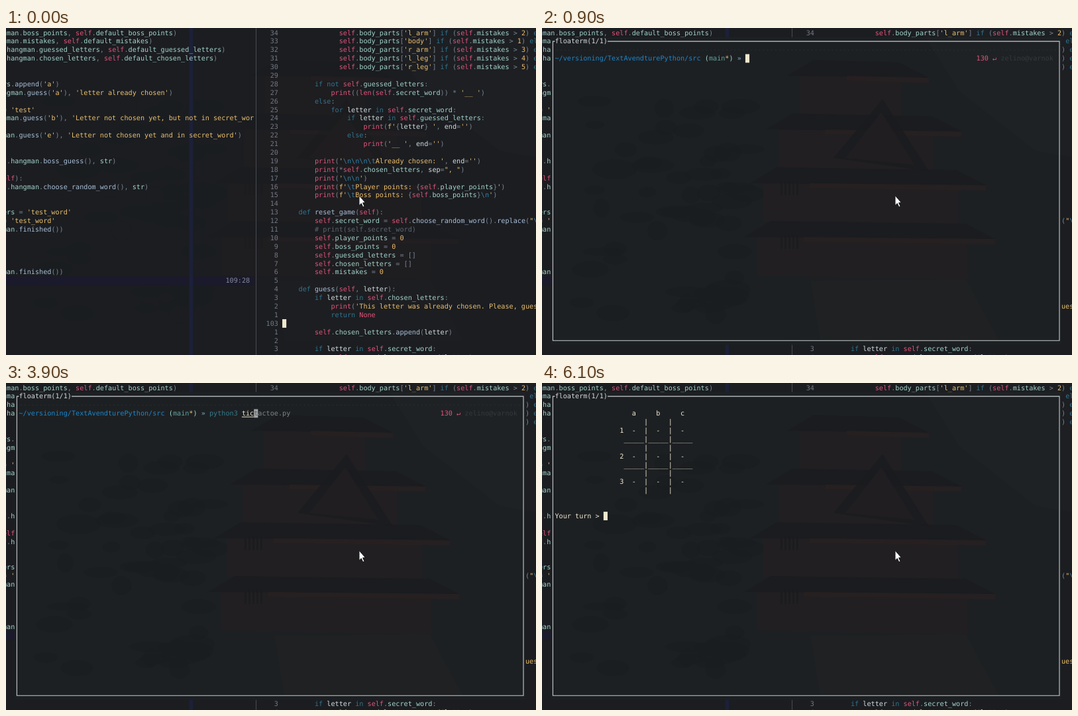
These frames come from a looping animation (800x493 px, 8000 ms). An HTML page with a canvas:

```html
<!DOCTYPE html>
<html lang="en">
<head>
<meta charset="utf-8">
<title>Terminal session</title>
<style>
html, body { margin: 0; width: 100%; height: 100%; overflow: hidden; background: #1c1e22; }
canvas { display: block; }
</style>
</head>
<body>
<canvas id="stage" width="800" height="493"></canvas>
<script>
const W = 800, H = 493, LOOP = 8000;
const CW = 6.117, CH = 12.89, X0 = 1.1, Y0 = 0.75;
const FONT = '10.16px "DejaVu Sans Mono", monospace';
const ctx = document.getElementById('stage').getContext('2d');

const C = {
  pink: '#e0557a', attr: '#a3d4cb', call: '#a9bfd8', key: '#31748f',
  str: '#ebbf6c', esc: '#3580a8', num: '#efbd6d', name: '#d3dde0', punct: '#7b8592',
  note: '#5f646e', line: '#737884', cream: '#f0e8cf', path: '#1b86cb', teal: '#35798a',
  ghost: '#7f8287', faint: '#35383c', edge: '#c8cbcd'
};

const KEYS = new Set(['if', 'else', 'for', 'in', 'not', 'def', 'return']);
const BUILTINS = new Set(['self', 'print', 'len', 'None']);

// Starts at column -10, so the pane is scrolled sideways
const leftCode = String.raw`
 self.hangman.boss_points, self.default_boss_points)
 self.hangman.mistakes, self.default_mistakes)
     self.hangman.guessed_letters, self.default_guessed_letters)
     self.hangman.chosen_letters, self.default_chosen_letters)


   .letters.append('a')
  self.hangman.guess('a'), 'letter already chosen')

         = 'test'
 self.hangman.guess('b'), 'Letter not chosen yet, but not in secret_wor

self.hangman.guess('e'), 'Letter not chosen yet and in secret_word')


      self.hangman.boss_guess(), str)

        self):
      self.hangman.choose_random_word(), str)


    .letters = 'test_word'
         = 'test_word'
self.hangman.finished())




self.hangman.finished())`;

// Starts at column 68
const rightCode = String.raw`
              self.body_parts['l_arm'] if (self.mistakes > 2) else ''
              self.body_parts['body'] if (self.mistakes > 1) else ''
              self.body_parts['r_arm'] if (self.mistakes > 3) else ''
              self.body_parts['l_leg'] if (self.mistakes > 4) else ''
              self.body_parts['r_leg'] if (self.mistakes > 5) else ''

        if not self.guessed_letters:
            print((len(self.secret_word)) * '__ ')
        else:
            for letter in self.secret_word:
                if letter in self.guessed_letters:
                    print(f'{letter} ', end='')
                else:
                    print('__ ', end='')

        print('\n\n\n\tAlready chosen: ', end='')
        print(*self.chosen_letters, sep=", ")
        print('\n\n')
        print(f'\tPlayer points: {self.player_points}')
        print(f'\tBoss points: {self.boss_points}\n')

    def reset_game(self):
        self.secret_word = self.choose_random_word().replace("\n", "")
        # print(self.secret_word)
        self.player_points = 0
        self.boss_points = 0
        self.guessed_letters = []
        self.chosen_letters = []
        self.mistakes = 0

    def guess(self, letter):
        if letter in self.chosen_letters:
            print('This letter was already chosen. Please, guess again')
            return None

        self.chosen_letters.append(letter)

        if letter in self.secret_word:
            self.guessed_letters.append(letter)`;

const colX = c => X0 + c * CW;
const rowY = r => Y0 + r * CH;

function text(col, row, s, color, bold) {
  ctx.font = (bold ? 'bold ' : '') + FONT;
  ctx.fillStyle = color;
  ctx.fillText(s, colX(col), rowY(row) + 9.78);
}

function block(col, row, color) {
  ctx.fillStyle = color;
  ctx.fillRect(colX(col), rowY(row), CW, CH);
}

function poly(color, ...p) {
  ctx.fillStyle = color;
  ctx.beginPath();
  for (let i = 0; i < p.length; i += 2) ctx.lineTo(p[i], p[i + 1]);
  ctx.closePath();
  ctx.fill();
}

// Splits code into [text, colour] pairs
function lex(code) {
  const out = [];
  const re = /#.*|f?'[^']*'?|f?"[^"]*"?|[A-Za-z_]\w*|\d+|\s+|./g;
  let prev = '', m;
  while ((m = re.exec(code))) {
    const t = m[0], next = code[re.lastIndex];
    if (t[0] === '#') out.push([t, C.note]);
    else if (/^f?['"]/.test(t)) out.push(...lexString(t));
    else if (KEYS.has(t)) out.push([t, C.key]);
    else if (BUILTINS.has(t)) out.push([t, C.pink]);
    else if (/^\d/.test(t)) out.push([t, C.num]);
    else if (/^\w/.test(t)) {
      out.push([t, next === '(' ? C.call : prev === '.' || t === 'str' ? C.attr : C.name]);
    } else out.push([t, C.punct]);
    prev = t;
  }
  return out;
}

function lexString(s) {
  const out = [];
  for (const t of s.match(/\\[a-z]?|\{[^}]*\}|[^\\{]+/g)) {
    if (t[0] === '\\') out.push([t, C.esc]);
    else if (t[0] === '{') out.push(['{', C.punct], ...lex(t.slice(1, -1)), ['}', C.punct]);
    else out.push([t, C.str]);
  }
  return out;
}

function drawCode(code, left) {
  code.slice(1).split('\n').forEach((line, row) => {
    let col = left;
    for (const [t, color] of lex(line)) {
      text(col, row, t, color);
      col += t.length;
    }
  });
}

function seeded(seed) {
  return () => (seed = (seed * 16807) % 2147483647) / 2147483647;
}

// Dim landscape: hill, trees and a tiered building
function wallpaper(base, alpha) {
  const wall = '#231f21', roof = '#1a1c1f', trim = '#272022';
  ctx.fillStyle = base;
  ctx.fillRect(0, 0, W, H);
  ctx.save();
  ctx.globalAlpha = alpha;
  poly('#202326', 570, 0, W, 0, W, 195, 745, 185, 630, 95);
  const rnd = seeded(7);
  for (let i = 0; i < 60; i++) {
    ctx.fillStyle = '#1b1e20';
    ctx.beginPath();
    ctx.ellipse(60 + rnd() * 250, 110 + rnd() * 330, 12 + rnd() * 22, 6 + rnd() * 9, 0, 0, 7);
    ctx.fill();
  }
  for (let i = 0; i < 4; i++) {
    const y = 78 + 81 * i, reach = Math.sin(i * 0.52);
    const left = 370 - 65 * reach, right = 584 + 100 * reach;
    poly(wall, left + 20, y - 8, right - 42, y, right - 42, y + 58, left + 20, y + 52);
    poly(roof, left, y - 6, left + 40, y - 30, right - 45, y - 26, right, y - 3);
    poly(trim, left + 90, y - 6, right, y - 3, right, y + 5, left + 90, y + 1);
    ctx.fillStyle = roof;
    for (let k = 0; k < 5 && i > 1; k++) ctx.fillRect(360 + k * 6, y - 10, 3, 22);
  }
  poly(roof, 440, 196, 514, 107, 584, 216);
  poly(wall, 458, 196, 512, 127, 562, 206);
  poly('#202123', 405, 381, 640, 379, 690, 472, 420, 472);
  ctx.restore();
}

function editor(showCursor) {
  wallpaper('#1b1d21', 0.5);
  ctx.fillStyle = '#1a1a2c';
  ctx.fillRect(0, rowY(29), colX(61), CH);
  ctx.fillStyle = '#1c2038';
  ctx.fillRect(colX(45), 0, CW, H);
  ctx.fillStyle = '#484b52';
  ctx.fillRect(377, 0, 1, H);
  drawCode(leftCode, -10);
  text(54, 29, '109:28', '#858a98');
  for (let r = 0; r < 39; r++) {
    const n = String(r === 34 ? 103 : Math.abs(34 - r));
    text(67 - n.length, r, n, C.line);
  }
  drawCode(rightCode, 68);
  if (showCursor) block(68, 34, C.cream);
}

function floatFrame() {
  ctx.save();
  ctx.beginPath();
  ctx.rect(colX(2), rowY(1), 126 * CW, 36 * CH);
  ctx.clip();
  wallpaper('#1d2023', 0.85);
  ctx.restore();
  const left = colX(2.5), right = colX(127.5), top = rowY(1.5), bottom = rowY(36.5);
  ctx.strokeStyle = C.edge;
  ctx.lineWidth = 1.1;
  ctx.beginPath();
  ctx.moveTo(colX(3), top);
  ctx.lineTo(left, top);
  ctx.lineTo(left, bottom);
  ctx.lineTo(right, bottom);
  ctx.lineTo(right, top);
  ctx.lineTo(colX(16), top);
  ctx.stroke();
  text(3, 1, 'floaterm(1/1)', '#d5d8d8');
}

const OLD = 'python3 main.py', CMD = 'python3 tictactoe.py';
const TYPE = 1800, KEY_GAP = 200, ACCEPT = 4100, ENTER = 4500, BOARD = 4600;

function prompt(t) {
  text(3, 2, '-'.repeat(124), '#2b2e32');
  text(3, 3, '~/versioning/TextAvendturePython/src', C.path);
  text(40, 3, '(', C.attr);
  text(41, 3, 'main', '#5fa39d');
  text(45, 3, '*', C.str);
  text(46, 3, ')', C.attr);
  text(48, 3, '»', '#7fa9bd');
  text(107, 3, '130 ↵', C.pink);
  text(113, 3, 'zelino@varnok', C.faint);

  const keys = Math.max(0, Math.floor((t - TYPE) / KEY_GAP) + 1);
  const n = t >= ACCEPT ? CMD.length : keys;
  const typed = CMD.slice(0, n), word = typed.slice(0, 7), arg = typed.slice(8);
  const rest = n ? (n > 8 ? CMD : OLD).slice(n) : '';
  const known = n >= 6;
  text(50, 3, word, known ? C.teal : C.pink, !known);
  if (arg) {
    text(58, 3, arg, C.cream);
    ctx.fillRect(colX(58), rowY(3) + 11.2, arg.length * CW, 1);
  }
  text(50 + n, 3, rest, C.ghost);
  if (t >= ENTER) block(3, 4, C.cream);
  else block(50 + n, 3, rest ? '#a3a3a5' : C.cream);
  if (rest) text(50 + n, 3, rest[0], '#5c5e63');
}

function board() {
  text(22, 3, 'a     b     c', C.cream);
  for (let i = 0; i < 3; i++) {
    const r = 4 + i * 3;
    text(25, r, '|     |', C.cream);
    text(19, r + 1, `${i + 1}  -  |  -  |  -`, C.cream);
    if (i < 2) text(20, r + 2, '_____|_____|_____', C.cream);
    else text(25, r + 2, '|     |', C.cream);
  }
  text(3, 15, 'Your turn >', C.cream);
  block(15, 15, C.cream);
}

function pointer() {
  ctx.lineWidth = 1;
  ctx.strokeStyle = '#15171a';
  poly('#fff', 533, 252.5, 533, 267.5, 536.3, 264.5, 538.8, 270, 541, 269, 538.6, 263.6, 542.3, 263.2);
  ctx.stroke();
}

function frame(now) {
  const t = Math.max(0, now - start) % LOOP;
  ctx.textRendering = 'geometricPrecision';
  editor(t < 800);
  if (t >= 900) {
    floatFrame();
    if (t < BOARD) prompt(t);
    else board();
  }
  pointer();
  requestAnimationFrame(frame);
}

const start = performance.now();
frame(start);
</script>
</body>
</html>
```
